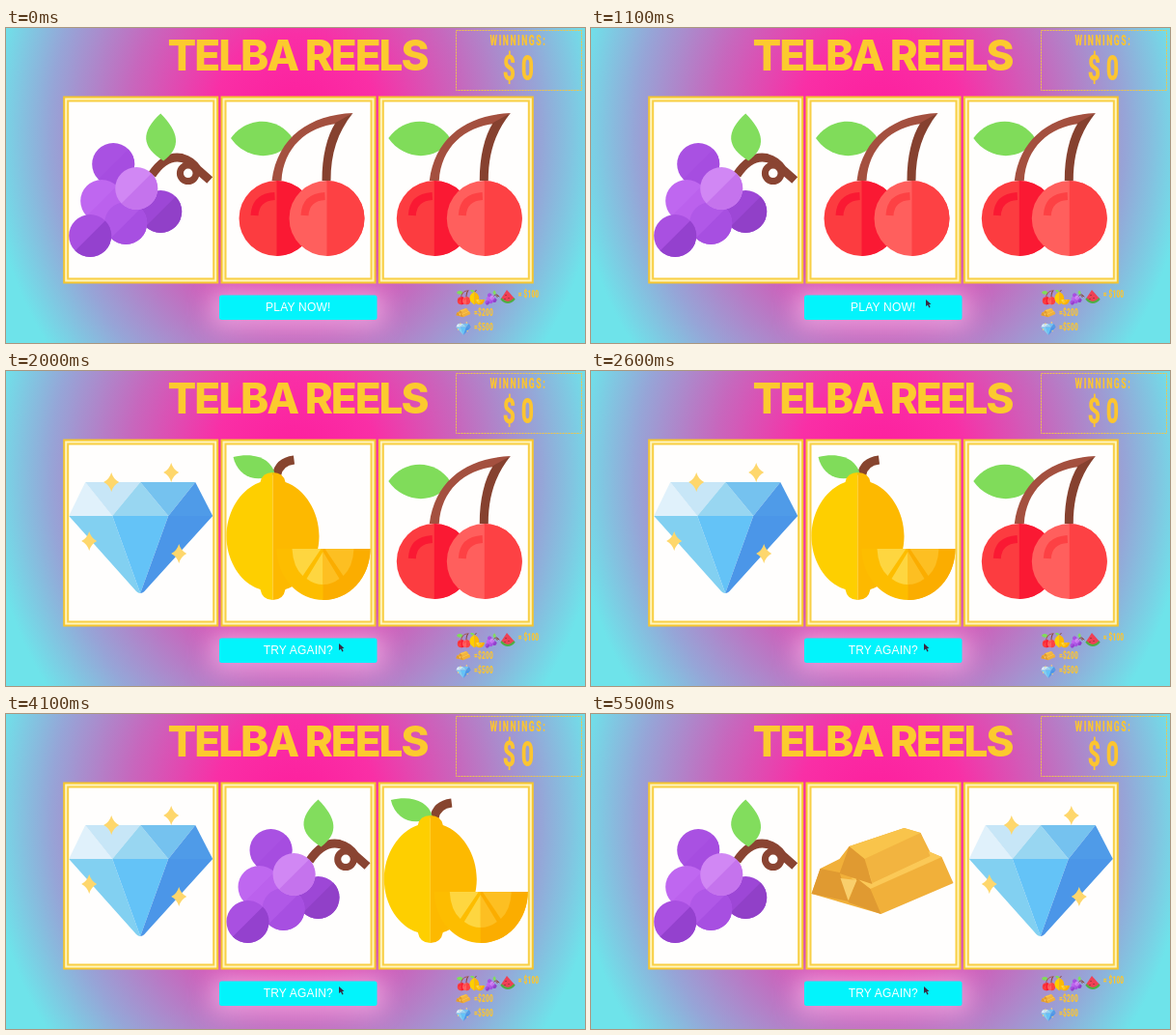
Animation of 600x326 px, one loop 5600 ms. Source, as an HTML page:

```html
<!DOCTYPE html>
<html lang="en">
<head>
<meta charset="utf-8">
<title>Slot machine</title>
<style>
html, body { margin: 0; width: 100%; height: 100%; overflow: hidden; }
svg { display: block; width: 600px; height: 326px; }
text { text-anchor: middle; }
.title { font: 800 44px Inter, sans-serif; letter-spacing: -2px; fill: #fcca2e; }
.slim { font-family: Roboto, sans-serif; font-weight: 800; fill: #fcc531; }
.label { font: 12px "Liberation Sans", Arial, sans-serif; letter-spacing: .2px; fill: #fff; }
</style>
</head>
<body>
<svg viewBox="0 0 600 326">
<defs>
  <radialGradient id="sky" gradientUnits="userSpaceOnUse" cx="0" cy="0" r="1" gradientTransform="translate(300 110) scale(318 370)">
    <stop offset="0" stop-color="#ff1a9b"/>
    <stop offset=".28" stop-color="#f92fa6"/>
    <stop offset=".55" stop-color="#c767bd"/>
    <stop offset=".8" stop-color="#96a5d7"/>
    <stop offset="1" stop-color="#6ee3ea"/>
  </radialGradient>
  <filter id="wide" x="-50%" y="-150%" width="200%" height="400%"><feGaussianBlur stdDeviation="12"/></filter>
  <filter id="tight" x="-20%" y="-80%" width="140%" height="260%"><feGaussianBlur stdDeviation="3"/></filter>

  <g id="card">
    <rect x="2" y="71.500" width="159" height="192" fill="#fff5bd" stroke="#f6c62f" stroke-width="2"/>
    <rect x="6" y="75.500" width="151" height="184" fill="#fffefd" stroke="#f8cf45" stroke-width="2"/>
  </g>

  <g id="grapes" transform="translate(-58)">
    <g fill="none" stroke="#8a4432">
      <path d="M151 152Q165 131 182 134.500Q192 137 198 146L211 157.500" stroke-width="9"/>
      <circle cx="188.500" cy="150.300" r="8.300" stroke-width="7"/>
    </g>
    <path d="M160 88.500C139 108 140 123 163 137.500C182 123 179 108 160 88.500" fill="#82dd5d"/>
    <g id="berries"></g>
  </g>

  <g id="cherries" transform="translate(-222)">
    <path d="M233.500 114C250 91 283 91 298 115C284 138 250 138 233.500 114" fill="#80dc5a"/>
    <circle cx="281" cy="197" r="39" fill="#fc3c40"/>
    <path d="M281 158a39 39 0 0 1 0 78z" fill="#fa1933"/>
    <circle cx="333" cy="197" r="39" fill="#ff5f5d"/>
    <path d="M333 158a39 39 0 0 1 0 78z" fill="#fd4144"/>
    <path d="M258 194Q259 175 279 174" fill="none" stroke="#fa1933" stroke-width="8"/>
    <path d="M310 194Q311 175 331 174" fill="none" stroke="#fd4144" stroke-width="8"/>
    <path d="M276 158C282 112 316 90 360 88L344 99C312 102 288 124 286 158Z" fill="#a4503f"/>
    <path d="M360 88C344 108 337 130 337 158H328C328 133 333 112 342 98Z" fill="#86412f"/>
  </g>

  <g id="lemon" transform="translate(-222)">
    <path d="M281 108Q283 94 299 92" fill="none" stroke="#87452f" stroke-width="9"/>
    <path d="M236 89C257 84 275 90 279 106C263 117 241 111 236 89" fill="#80dc5a"/>
    <path d="M277 105Q266 105 264 115C244 122 229 145 229 171S244 220 264 226Q266 237 277 237Z" fill="#fecf00"/>
    <path d="M277 105Q288 105 290 115C310 122 325 145 325 171S310 220 290 226Q288 237 277 237Z" fill="#fdb900"/>
    <path d="M281 184H378A48.500 53 0 0 1 281 184" fill="#fdbd00"/>
    <path d="M329 184H378A48.500 53 0 0 1 329 237Z" fill="#fbad00"/>
    <path d="M297 184H327L308 212Q298 203 297 184M329 187V221Q320 221 312 215Z" fill="#fed640"/>
    <path d="M331 184H361Q360 203 350 212ZM329 187L346 215Q338 221 329 221Z" fill="#fdbf22"/>
  </g>

  <g id="gold" transform="translate(-222)">
    <path d="M229 186L238 160L258 150L268 137L325 118L342 123L352 143L364 148L376 175L301 207Z" fill="#f1b03a"/>
    <path d="M270 170L350 142L364 148L290 181Z" fill="#fbc957"/>
    <path d="M284 150L342 123L352 147L292 175Z" fill="#f2b440"/>
    <path d="M268 137L325 118L342 123L284 150Z" fill="#f9c44b"/>
    <path d="M258 165L268 137L284 150L292 176ZM229 186L238 160L258 164L268 194ZM267 195L276 170L290 181L301 207Z" fill="#e09a31"/>
    <path d="M259 170L276 172L267 193Z" fill="#f9cf6c"/>
  </g>

  <g id="diamond" transform="translate(-58)">
    <path d="M82 115L65 150H110Z" fill="#e0f1fb"/>
    <path d="M82 115H139L110 150Z" fill="#c7e6f7"/>
    <path d="M139 115L110 150H168Z" fill="#98d6f1"/>
    <path d="M139 115H196L168 150Z" fill="#75c2ef"/>
    <path d="M196 115L214 150H168Z" fill="#4f9be8"/>
    <path d="M65 150H110L139 230Q136 230 133 226Z" fill="#82d0f1"/>
    <path d="M110 150H168L139 230Z" fill="#64c3f7"/>
    <path d="M168 150H214L145 226Q142 230 139 230Z" fill="#4b96e8"/>
    <g id="sparkles" fill="#fed76c"></g>
  </g>
</defs>

<rect width="600" height="326" fill="url(#sky)"/>
<rect id="glow" x="213" y="272" width="179" height="38" fill="#ffc0ee" filter="url(#wide)"/>
<text class="title" x="302" y="44">TELBA REELS</text>

<rect x="466.500" y="2.500" width="130" height="62" fill="none" stroke="#f0c548" stroke-dasharray="2 1"/>
<g id="slim" class="slim"></g>
<g id="prizes"></g>
<path d="M519 271L527 280Q520 287 513 280Z" fill="#ef4055"/>
<path d="M527 280Q520 288 513 280" fill="none" stroke="#4fae43" stroke-width="2"/>
<path d="M518 276v1m3 2v1m-4 0v1" stroke="#62302f"/>

<g id="reels"></g>
<rect x="221" y="276.500" width="163.500" height="25.500" rx="2.500" fill="#02f4fc"/>
<g id="pressed">
  <rect x="220" y="275.500" width="165.500" height="27.500" fill="#45c8f0" filter="url(#tight)"/>
  <rect x="221" y="276.500" width="163.500" height="25.500" rx="2.500" fill="#08c4ee"/>
</g>
<text id="label" class="label" x="302.800" y="293"></text>
<path id="cursor" d="M0 0V7L2 5.500L3.300 8.500L4.600 8L3.300 5H5.500Z" fill="#3a2840"/>
</svg>
<script>
const LOOP = 5600;
const $ = id => document.getElementById(id);
const clamp = v => Math.min(1, Math.max(0, v));
const fill = (id, items, draw) => $(id).innerHTML = items.map(draw).join("");

fill("berries", [
  [111, 141, "#a951e2", "#a64de0"], [160, 190, "#9d47d6", "#9140c8"],
  [99, 179, "#bf67f0", "#bb61ed"], [124, 202, "#b058e7", "#a74fe1"],
  [87, 215, "#a950e1", "#9441ce"], [135, 166, "#d187f4", "#c573ed"]
], ([x, y, light, dark]) => `<g transform="translate(${x} ${y}) rotate(45)">
  <circle r="22" fill="${light}"/><path d="M0-22a22 22 0 0 1 0 44z" fill="${dark}"/></g>`);

fill("sparkles", [[109, 115], [171, 105], [86, 176], [179, 189]], ([x, y]) =>
  `<path transform="translate(${x} ${y})" d="M0-10Q2-3 8 0Q2 3 0 10Q-2 3-8 0Q-2-3 0-10"/>`);

fill("slim", [
  [531, 18, 14, 2.5, "WINNINGS:"], [531, 53.5, 37, 0, "$ 0"],
  [541.5, 279, 10.5, .3, "= $100"], [495, 297.5, 10.5, .3, "=$200"], [495, 313, 10.5, .3, "=$500"]
], ([x, y, size, gap, words]) => `<text transform="translate(${x} ${y}) scale(.62 1)"
  font-size="${size}" letter-spacing="${gap}">${words}</text>`);

fill("prizes", [
  ["cherries", 474, 279], ["lemon", 488, 279], ["grapes", 504, 279],
  ["gold", 474, 295], ["diamond", 474, 311]
], ([name, x, y]) =>
  `<use href="#${name}" transform="translate(${x} ${y}) scale(.102) translate(-81 -165)"/>`);

fill("reels", [0, 1, 2], i => `<g transform="translate(${58.2 + i * 163.3})">
  <use href="#card"/><use class="symbol"/></g>`);

const symbols = document.querySelectorAll(".symbol");
const spins = [
  [0, "grapes", "cherries", "cherries"],
  [1900, "diamond", "lemon", "cherries"],
  [3500, "diamond", "grapes", "lemon"],
  [4900, "grapes", "gold", "diamond"]
];
let shown;

function frame(now) {
  const t = now % LOOP;
  const spin = spins.findLast(s => s[0] <= t);
  if (spin !== shown) {
    shown = spin;
    symbols.forEach((el, i) => el.setAttribute("href", "#" + spin[i + 1]));
    $("label").textContent = spin[0] ? "TRY AGAIN?" : "PLAY NOW!";
  }
  // Each press peaks just before its spin lands.
  const press = Math.max(...spins.slice(1).map(([at]) => clamp(1 - Math.abs(t - at + 100) / 200)));
  $("pressed").setAttribute("opacity", press);
  $("glow").setAttribute("opacity", .62 * (1 - press));

  const ease = 1 - (1 - clamp((t - 300) / 700)) ** 3;
  const drift = clamp((t - 1200) / 600);
  const x = 400 - 53 * ease - 2 * drift;
  const y = 328 - 47 * ease + drift;
  $("cursor").setAttribute("transform", `translate(${x} ${y})`);
  requestAnimationFrame(frame);
}
requestAnimationFrame(frame);
</script>
</body>
</html>
```
